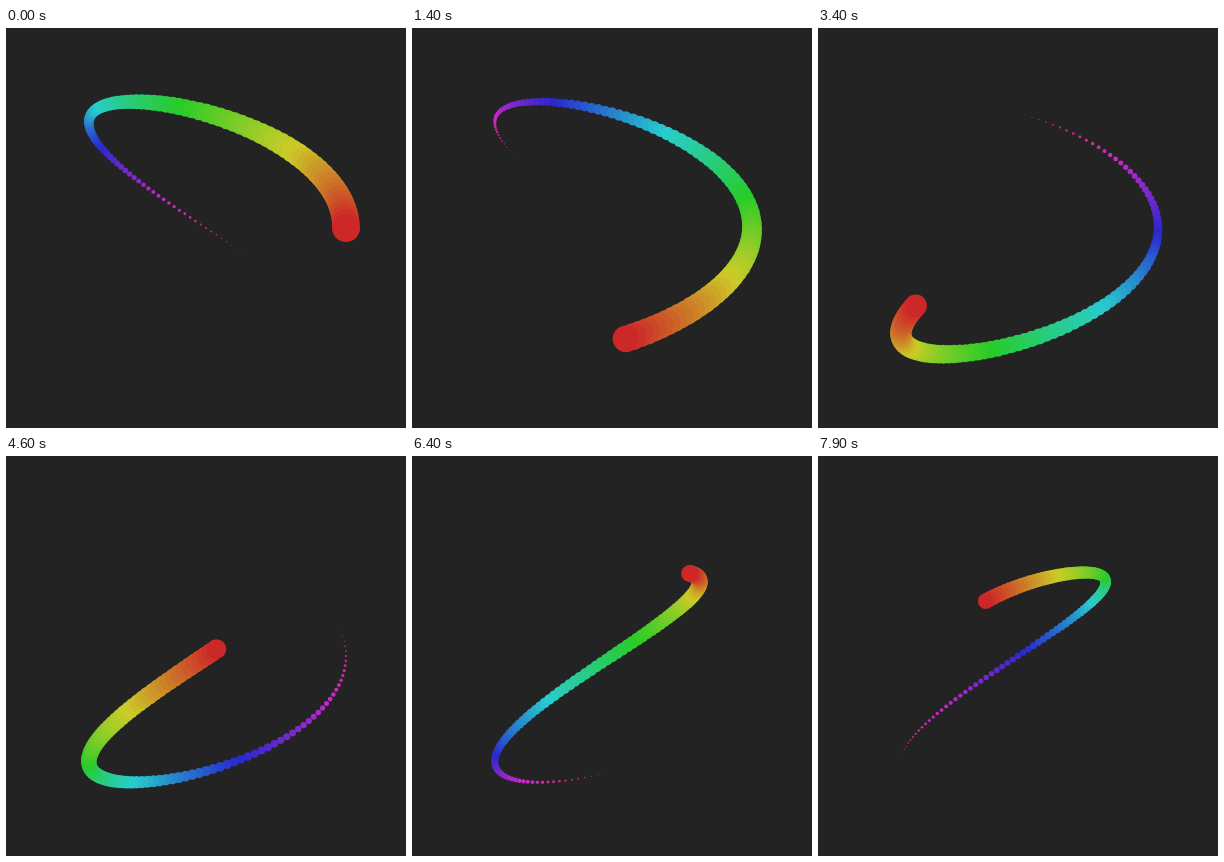
Animation of 400 by 400 pixels, one loop 8000 ms. Source, as an HTML page with a canvas:

```html
<!DOCTYPE html>
<html lang="en">
<head>
<meta charset="utf-8">
<title>Rainbow comet</title>
<style>
  html, body { margin: 0; width: 100%; height: 100%; overflow: hidden; background: #232323; }
  canvas { display: block; width: 400px; height: 400px; }
</style>
</head>
<body>
<canvas id="stage" width="400" height="400"></canvas>
<script>
  const ctx = document.getElementById('stage').getContext('2d');
  const LOOP = 8000;    // ms
  const STEP = 100;     // ms per picture
  const DOTS = 100;
  const GAP = 50;       // ms between neighbouring dots
  const ORBIT = 100;
  const FOCAL = 350;
  const DOT_RADIUS = 10;
  const CENTER = 200;

  // A 3:2:1 Lissajous curve in space, seen in perspective.
  function project(time) {
    const a = time / GAP * Math.PI / 180;
    const scale = FOCAL / (FOCAL - ORBIT * Math.cos(a));
    return {
      x: CENTER + ORBIT * Math.cos(3 * a) * scale,
      y: CENTER + ORBIT * Math.sin(2 * a) * scale,
      scale
    };
  }

  function draw(time) {
    ctx.fillStyle = '#232323';
    ctx.fillRect(0, 0, 400, 400);
    // From the tail forward, so the head lies on top.
    for (let i = DOTS - 1; i >= 0; i--) {
      const p = project(time - i * GAP);
      const age = i / DOTS;
      ctx.fillStyle = `hsl(${360 * age}, 67%, 48%)`;
      ctx.beginPath();
      ctx.arc(p.x, p.y, DOT_RADIUS * (1 - age) * p.scale, 0, 2 * Math.PI);
      ctx.fill();
    }
  }

  const start = performance.now();
  function tick() {
    const t = (performance.now() - start) % LOOP;
    draw(Math.floor(t / STEP) * STEP);
    requestAnimationFrame(tick);
  }
  tick();
</script>
</body>
</html>
```
